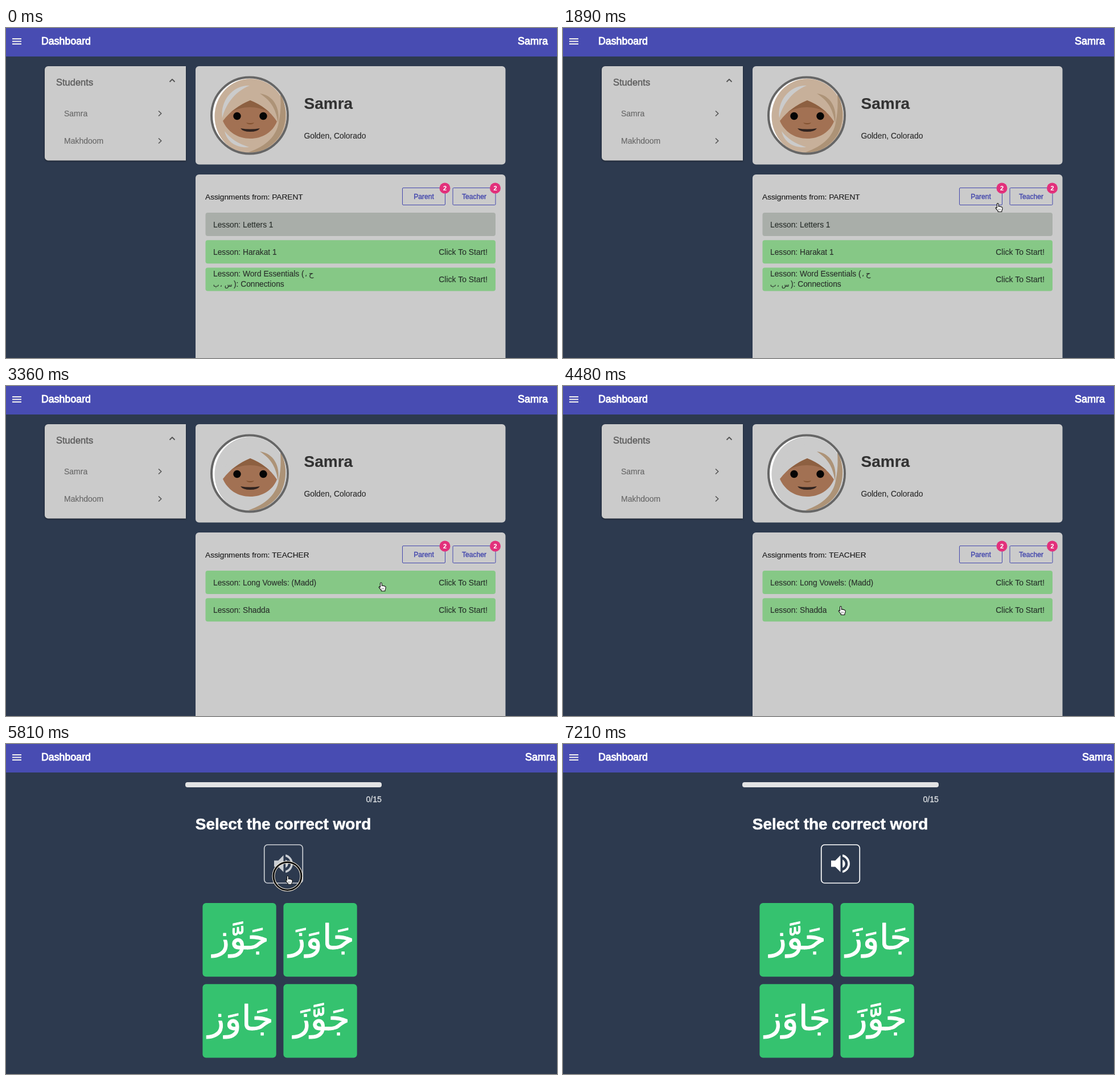
An HTML page with a canvas for the animation above (7.28 s loop, 968 px wide and 579 px high).

```html
<!DOCTYPE html>
<html lang="en">
<head>
<meta charset="utf-8">
<title>Lesson dashboard</title>
<style>
html, body { margin: 0; width: 100%; height: 100%; overflow: hidden; background: #2d3a4f; }
canvas { display: block; width: 968px; height: 579px; }
</style>
</head>
<body>
<canvas id="stage" width="968" height="579"></canvas>
<script>
const ctx = document.getElementById('stage').getContext('2d');
const LOOP = 7280, STEP = 70;
const TEACHER_AT = 2870, LESSON_AT = 4550;
const SANS = '"Liberation Sans", Arial, sans-serif';
const ARABIC = '"DejaVu Sans", sans-serif';
const CARD = '#cbcbcb', BG = '#2d3a4f', GREEN = '#86c886', INDIGO = '#4448ad';
const STUDENT = 'Samra', SIBLING = 'Makhdoom';

// Pointer keys: time, x, y
const PATH = [
  [420, 862, 600], [840, 752, 352], [1050, 727, 311], [1610, 727, 311],
  [2310, 829, 303], [2940, 829, 303], [3780, 487, 388], [4690, 487, 387],
  [5320, 494, 232], [5880, 494, 232], [6160, 482, 490], [6720, 482, 505], [7070, 482, 600]
];
const CLICKS = [[2800, 2940], [4200, 4340], [5740, 5950]];

function box(x, y, w, h, r, fill) {
  ctx.beginPath();
  ctx.roundRect(x, y, w, h, r);
  ctx.fillStyle = fill;
  ctx.fill();
}

function frame(x, y, w, h, r, color, width) {
  ctx.beginPath();
  ctx.roundRect(x, y, w, h, r);
  ctx.strokeStyle = color;
  ctx.lineWidth = width;
  ctx.stroke();
}

function dot(x, y, r, fill) {
  ctx.beginPath();
  ctx.arc(x, y, r, 0, Math.PI * 2);
  ctx.fillStyle = fill;
  ctx.fill();
}

function ring(x, y, r, color, width) {
  ctx.beginPath();
  ctx.arc(x, y, r, 0, Math.PI * 2);
  ctx.strokeStyle = color;
  ctx.lineWidth = width;
  ctx.stroke();
}

function line(points, color, width) {
  ctx.beginPath();
  points.forEach(([x, y]) => ctx.lineTo(x, y));
  ctx.strokeStyle = color;
  ctx.lineWidth = width;
  ctx.stroke();
}

function shape(d, fill) {
  ctx.fillStyle = fill;
  ctx.fill(new Path2D(d));
}

// "heavy" thickens the letters a little
function text(str, x, y, size, color, { align = 'left', weight = '', family = SANS, heavy = 0.15 } = {}) {
  ctx.font = `${weight} ${size}px ${family}`;
  ctx.textAlign = align;
  ctx.fillStyle = ctx.strokeStyle = color;
  ctx.fillText(str, x, y);
  ctx.lineWidth = heavy;
  ctx.lineJoin = 'round';
  ctx.strokeText(str, x, y);
}

function header(nameX) {
  box(0, 0, 968, 50, 0, '#484cb2');
  for (const y of [18, 22.5, 27]) box(11, y, 16, 2, 0, '#f4f3f0');
  text('Dashboard', 62, 29, 17.8, '#fff', { heavy: 0.9 });
  text(STUDENT, nameX, 29, 18, '#fff', { align: 'right', heavy: 0.9 });
}

function studentsCard() {
  ctx.save();
  ctx.shadowColor = 'rgba(0,0,0,0.5)';
  ctx.shadowBlur = 3;
  ctx.shadowOffsetY = 1;
  box(68, 67, 248, 165.5, [6, 0, 0, 6], CARD);
  ctx.restore();
  text('Students', 88, 101, 16.5, '#606060', { heavy: 0.5 });
  line([[287.5, 94.5], [292, 90], [296.5, 94.5]], '#555', 1.8);
  [STUDENT, SIBLING].forEach((name, i) => {
    const y = 150 + i * 48;
    text(name, 102, y + 5, 14, '#686868');
    line([[268, y - 4.5], [272.8, y], [268, y + 4.5]], '#555', 1.7);
  });
}

function avatar(scarf) {
  ctx.save();
  ctx.beginPath();
  ctx.arc(428, 153.5, 66, 0, Math.PI * 2);
  ctx.clip();
  ctx.fillStyle = '#fff';
  ctx.fillRect(360, 85, 136, 136);
  ctx.beginPath();
  ctx.ellipse(429.5, 155, 63, 66, 0, 0, Math.PI * 2);
  ctx.fillStyle = scarf ? '#c7b09a' : CARD;
  ctx.fill();
  shape('M428 101C398 100 376 128 380 158C384 138 400 112 428 101Z', CARD);
  shape('M384 181C389 202 407 211 427 209C408 203 394 194 384 181Z', CARD);
  shape('M446 115C470 118 482 140 478 166C474 145 469 130 446 115Z', '#ad9377');
  shape('M482 116C493 133 495 162 483 186C471 206 450 220 426 218C458 207 475 189 479 166C483 148 483 132 482 116Z', '#ad9377');
  ctx.restore();

  shape('M381 163C396 144 410 135 429 127C449 135 463 145 476 164C468 184 449 194 429 194C407 194 389 182 381 163Z', '#a27153');
  shape('M395 148C407 138 417 132 429 127C442 132 453 139 463 148C442 136 414 136 395 148Z', '#8d6041');
  dot(406, 154.5, 6.7, '#050505');
  dot(452, 154.5, 6.7, '#050505');
  shape('M422 166Q429 168 436 166Q434 169 429 169Q424 169 422 166Z', '#82512f');
  shape('M412 176Q429 179 446 176Q442 182 429 182Q416 182 412 176Z', '#30231f');
  ring(428, 153.5, 67, '#666', 4);
}

function tab(label, x) {
  frame(x + 0.5, 280.5, 75, 30, 1.5, INDIGO, 1);
  text(label, x + 38, 300, 12.1, INDIGO, { align: 'center', heavy: 0.4 });
  dot(x + 75, 281, 9.5, '#e2307b');
  text('2', x + 75, 285, 11, '#fff', { align: 'center', weight: 'bold' });
}

function row(i, label, open = true) {
  const y = 324 + i * 48.2;
  box(350.5, y, 509.5, 41, 4, open ? GREEN : '#a9aea9');
  if (label) text(label, 364, y + 26, 13.75, '#2a302c');
  if (open) text('Click To Start!', 846, y + 26, 13.9, '#26322a', { align: 'right' });
}

function wordRow() {
  const ink = '#2a302c', ar = { family: ARABIC };
  row(2, '');
  text('Lesson: Word Essentials (', 364, 436, 13.75, ink);
  text('،', 525, 436, 12, ink, ar);
  text('ح', 532, 436, 13, ink, ar);
  text('ب', 364, 454, 11, ink, ar);
  text('،', 376, 454, 11, ink, ar);
  text('س', 384, 454, 11, ink, ar);
  text('): Connections', 400, 454, 13.75, ink);
}

function dashboard(teacher) {
  header(952);
  studentsCard();
  box(333, 67, 544.5, 172.5, 6, CARD);
  avatar(!teacher);
  text(STUDENT, 523.5, 142, 28, '#333', { weight: 'bold' });
  text('Golden, Colorado', 523.5, 194, 13.9, '#2b2b2b');

  box(333, 257, 544.5, 340, 6, CARD);
  text('Assignments from: ' + (teacher ? 'TEACHER' : 'PARENT'), 350, 301, 13.7, '#1c1c1c');
  tab('Parent', 696);
  tab('Teacher', 784.5);
  if (teacher) {
    row(0, 'Lesson: Long Vowels: (Madd)');
    row(1, 'Lesson: Shadda');
  } else {
    row(0, 'Lesson: Letters 1', false);
    row(1, 'Lesson: Harakat 1');
    wordRow();
  }
}

function speaker(alpha) {
  ctx.save();
  ctx.globalAlpha = alpha;
  frame(453.75, 176.75, 67.5, 67.25, 6, '#fff', 1.7);
  ctx.translate(465.5, 188);
  ctx.scale(1.83, 1.83);
  shape('M3 9v6h4l5 5V4L7 9H3zM16.5 12c0-1.77-1-3.3-2.5-4v8c1.5-.7 2.5-2.2 2.5-4zM14 3.2v2.1c2.9.9 5 3.5 5 6.7s-2.1 5.8-5 6.7v2.1c4-.9 7-4.5 7-8.8s-3-7.9-7-8.8z', '#fff');
  ctx.restore();
}

function lesson(overSpeaker) {
  header(965);
  box(315, 67, 345, 9, 4, '#e3e3e4');
  text('0/15', 660, 102, 14.2, '#dfe2e5', { align: 'right', heavy: 0.3 });
  text('Select the correct word', 487, 150, 27.9, '#fff', { align: 'center', weight: 'bold', heavy: 0.6 });
  speaker(overSpeaker ? 0.75 : 1);
  ['جَوَّز', 'جَاوَزَ', 'جَاوَز', 'جَوَّزَ'].forEach((word, i) => {
    const x = 345.4 + (i % 2) * 142, y = 279 + (i >> 1) * 142.2;
    box(x, y, 129.3, 129.3, 6, '#35c26f');
    text(word, x + 67, y + 81, 61, '#fff', { align: 'center', family: ARABIC, heavy: 1 });
  });
}

function pointerAt(t) {
  const n = PATH.findIndex(k => k[0] > t);
  if (n < 1) return null;
  const [t0, x0, y0] = PATH[n - 1], [t1, x1, y1] = PATH[n];
  const u = (t - t0) / (t1 - t0), e = u * u * (3 - 2 * u);
  return { x: x0 + (x1 - x0) * e, y: y0 + (y1 - y0) * e };
}

function inside(p, x, y, w, h) {
  return p && p.x >= x && p.x <= x + w && p.y >= y && p.y <= y + h;
}

function isHot(p, scene) {
  const spots = scene === 'lesson'
    ? [[453, 176, 69, 69], [345.5, 279, 129, 129], [487.5, 279, 129, 129], [345.5, 421, 129, 129], [487.5, 421, 129, 129]]
    : [[696, 280, 76, 30.5], [784.5, 280, 76, 30.5], [350.5, 372, 509.5, 41],
       scene === 'teacher' ? [350.5, 324, 509.5, 41] : [350.5, 420, 509.5, 41]];
  return spots.some(s => inside(p, ...s));
}

const ARROW = new Path2D('M0 0V12.5L3 9.8L5 14.3L7.2 13.3L5.2 9H9.2Z');
const HAND = new Path2D('M0 1.2C0 -.7 2.6 -.7 2.7 1.2V5.5C3.2 4.4 5 4.6 5.2 5.7C6 5 7.4 5.3 7.6 6.4C8.6 6 9.6 6.6 9.6 7.8C9.7 10 9.2 11.5 8.4 12.8V14.6H1.8V13C.2 11.5 -1.2 9.8 -2.3 8.2C-2.7 6.8 -1.4 6.5 -.4 7.5L0 8Z');

function pointer(p, hand) {
  ctx.save();
  ctx.translate(p.x, p.y);
  ctx.lineJoin = 'round';
  if (hand) {
    ctx.translate(-0.5, -0.3);
    ctx.fillStyle = '#fff';
    ctx.strokeStyle = '#111';
    ctx.lineWidth = 1.1;
    ctx.fill(HAND);
    ctx.stroke(HAND);
    line([[3.2, 9], [3.2, 12]], '#333', 0.7);
    line([[5.6, 9], [5.6, 12]], '#333', 0.7);
  } else {
    ctx.strokeStyle = '#fff';
    ctx.lineWidth = 1.8;
    ctx.stroke(ARROW);
    ctx.fillStyle = '#080808';
    ctx.fill(ARROW);
  }
  ctx.restore();
}

function clickRing(p) {
  ring(p.x + 0.4, p.y - 0.2, 24.5, '#f3ebdc', 4.8);
  ring(p.x + 0.4, p.y - 0.2, 24.5, '#080808', 2.8);
}

function draw(now) {
  const t = Math.floor((now % LOOP) / STEP) * STEP;
  const scene = t >= LESSON_AT ? 'lesson' : t >= TEACHER_AT ? 'teacher' : 'parent';
  const p = pointerAt(t);
  ctx.fillStyle = BG;
  ctx.fillRect(0, 0, 968, 579);
  if (scene === 'lesson') lesson(inside(p, 453, 176, 69, 69));
  else dashboard(scene === 'teacher');
  if (p) {
    if (CLICKS.some(([a, b]) => t >= a && t < b)) clickRing(p);
    pointer(p, isHot(p, scene));
  }
}

const start = performance.now();
function tick() {
  draw(performance.now() - start);
  requestAnimationFrame(tick);
}
tick();
</script>
</body>
</html>
```
